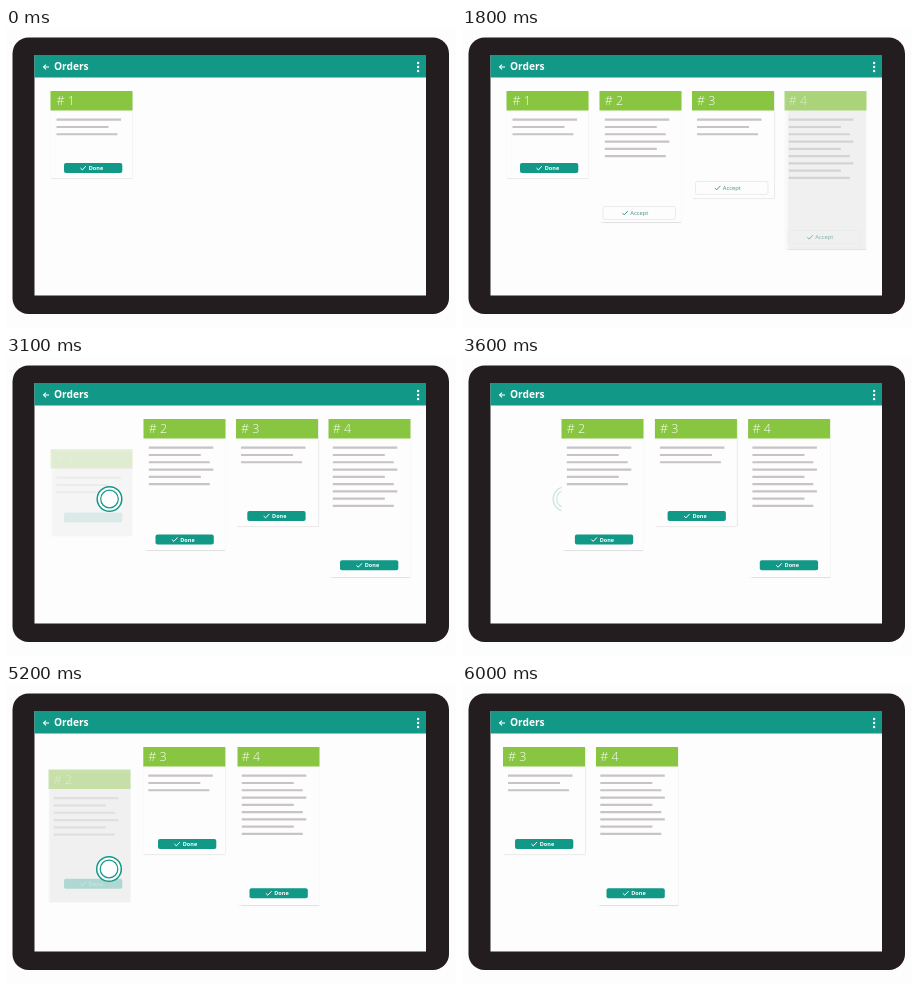
These frames come from a looping animation (450x300 px, 7.2 s). An HTML page with a canvas:

```html
<!DOCTYPE html>
<html lang="en">
<head>
<meta charset="utf-8">
<title>Orders</title>
<style>
  html, body { margin: 0; width: 100%; height: 100%; overflow: hidden; background: #fdfdfd; }
  canvas { display: block; }
</style>
</head>
<body>
<canvas id="stage" width="450" height="300"></canvas>
<script>
const ctx = document.getElementById('stage').getContext('2d');
const LOOP = 7200, STEP = 100;
const TEAL = '#129887', GREEN = '#88c540', PAPER = '#fdfdfd', BLACK = '#231d1f';
const FONT = '"Open Sans", "Noto Sans", sans-serif';

// x, bx: card and button positions before, between and after the two slides
const cards = [
  { n: 1, x: [44.5], bx: [58], bottom: 150, lines: 3, inset: 6, by: 135,
    fade: [-2, -1], done: 0, tap: { at: 2500, x: 103.5, y: 143, scale: 1.85 } },
  { n: 2, x: [137.5, 42.5], bx: [149.5, 58], bottom: 194.5, lines: 6, inset: 5.3, by: 178.5,
    fade: [500, 800], done: 2100, tap: { at: 4700, x: 103, y: 185, scale: 1.75 } },
  { n: 3, x: [230, 137.3, 41], bx: [241.3, 152, 53], bottom: 170, lines: 3, inset: 5, by: 155,
    fade: [1245, 1400], done: 2700 },
  { n: 4, x: [322.5, 231.5, 134], bx: [334, 243.5, 144.5], bottom: 221.5, lines: 9, inset: 4.3, by: 204.3,
    fade: [1600, 1900], done: 3000 }
];

const ramp = (t, a, b) => Math.min(1, Math.max(0, (t - a) / (b - a)));
const mix = (a, b, p) => a + (b - a) * p;

function along(stops, p) {
  const i = Math.min(Math.floor(p), stops.length - 1);
  return mix(stops[i], stops[Math.min(i + 1, stops.length - 1)], p - Math.floor(p));
}

function box(x, y, w, h, r, fill) {
  ctx.beginPath();
  ctx.roundRect(x, y, w, h, r);
  ctx.fillStyle = fill;
  ctx.fill();
}

function text(str, x, y, font, fill) {
  ctx.font = font + ' ' + FONT;
  ctx.fillStyle = fill;
  ctx.fillText(str, x, y);
}

function path(points, color, width) {
  ctx.beginPath();
  points.forEach(([x, y]) => ctx.lineTo(x, y));
  ctx.strokeStyle = color;
  ctx.lineWidth = width;
  ctx.stroke();
}

const check = (x, y, color) => path([[x, y], [x + 1.9, y + 1.9], [x + 5.6, y - 2]], color, 1);

function tablet() {
  box(0, 0, 450, 300, 0, PAPER);
  box(6.5, 9.5, 436.5, 276.5, 16, BLACK);
  box(28.5, 27, 391.5, 240.5, 0, PAPER);
  box(28.5, 27, 391.5, 22.5, 0, TEAL);
  path([[43, 39], [37.6, 39]], '#fff', 1.1);
  path([[40, 36.6], [37.6, 39], [40, 41.4]], '#fff', 1.1);
  text('Orders', 48, 42.3, '700 10.2px', '#fff');
  for (const y of [35, 39, 43]) box(410.9, y - 1.2, 2.4, 2.4, 1.2, '#fff');
}

function doneButton(x, y) {
  box(x, y, 58.3, 10, 2, TEAL);
  check(x + 16.4, y + 5, '#fff');
  text('Done', x + 24.8, y + 7, '700 5.5px', '#fff');
}

function acceptButton(x, y) {
  ctx.beginPath();
  ctx.roundRect(x, y - 6.5, 72.5, 13, 2);
  ctx.strokeStyle = '#e9ecec';
  ctx.lineWidth = 1;
  ctx.stroke();
  check(x + 19.3, y, '#3b9c8d');
  text('Accept', x + 27.3, y + 2, '400 5.8px', '#4b8f84');
}

function drawCard(c, t, slide) {
  const leave = c.tap ? ramp(t, c.tap.at + 200, c.tap.at + 700) : 0;
  const shown = ramp(t, ...c.fade);
  const x = along(c.x, slide), drop = 37.5 * leave;
  if (!shown || leave === 1) return;

  ctx.save();
  ctx.globalAlpha = shown * (1 - leave);
  ctx.shadowColor = 'rgba(0,0,0,.22)';
  ctx.shadowBlur = 1.5;
  ctx.shadowOffsetX = ctx.shadowOffsetY = 0.6;
  box(x, 63 + drop, 82, c.bottom - 63, 0, PAPER);
  ctx.shadowColor = 'transparent';
  box(x, 63 + drop, 82, 19.5, 0, GREEN);
  text('# ' + c.n, x + c.inset, 77 + drop, '300 12.5px', '#fff');
  for (let i = 0; i < c.lines; i++)
    box(x + c.inset, 90.6 + i * 7.28 + drop, [64.5, 52, 61][i % 3], 2.2, 0, '#c8c3c6');

  ctx.globalAlpha = shown * (1 - leave) ** 1.35;
  if (t >= c.done) doneButton(along(c.bx, slide), c.by + 27 * leave);
  else acceptButton(x + 3.5, c.n === 2 ? 185 : c.by + 4.9);
  ctx.restore();
}

function drawTap(tap, t) {
  const u = t - tap.at;
  if (u < 0 || u >= 1200) return;
  const scale = u < 100 ? mix(tap.scale, 2.15, u / 100) : mix(2.15, 1, ramp(u, 100, 400));
  const shift = Math.min(3, 4 * (scale - 1));
  ctx.save();
  ctx.globalAlpha = mix(0.15, 1, ramp(u, 0, 400)) * (1 - ramp(u, 700, 1200));
  ctx.translate(tap.x + shift, tap.y - shift);
  ctx.scale(scale, scale);
  ctx.strokeStyle = TEAL;
  ctx.fillStyle = PAPER;
  for (const [r, w] of [[12.3, 1.5], [8.8, 1.2]]) {
    ctx.beginPath();
    ctx.arc(0, 0, r, 0, 2 * Math.PI);
    ctx.lineWidth = w;
    ctx.fill();
    ctx.stroke();
  }
  ctx.restore();
}

function frame(now) {
  const t = Math.floor((now % LOOP) / STEP) * STEP;
  const slide = ramp(t, 3400, 3900) + ramp(t, 5500, 6000);
  tablet();
  for (const c of cards) {
    drawCard(c, t, slide);
    if (c.tap) drawTap(c.tap, t);
  }
  requestAnimationFrame(tick);
}

const start = performance.now();
const tick = () => frame(performance.now() - start);
tick();
</script>
</body>
</html>
```
